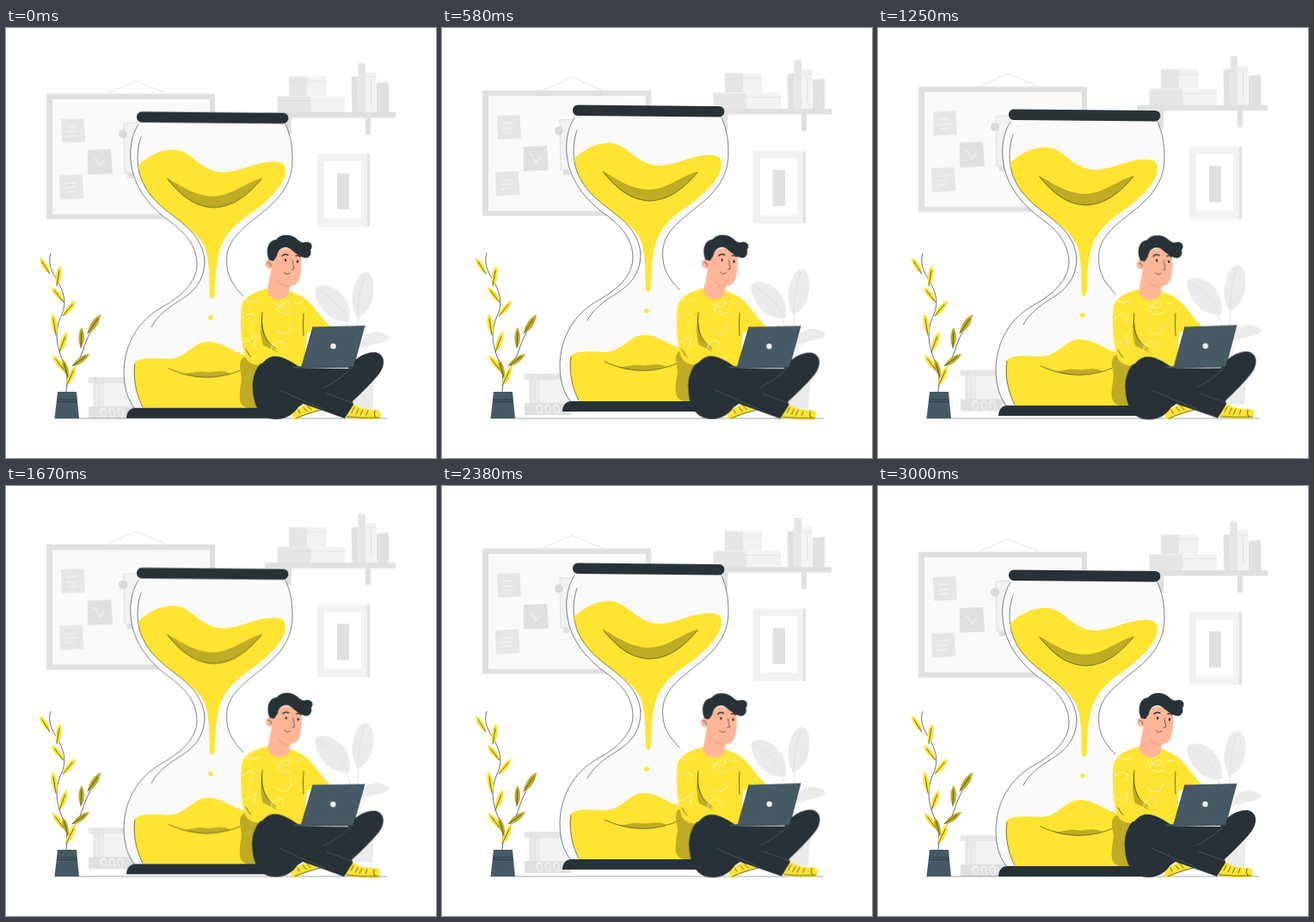
These frames come from a looping animation (500 by 500 pixels, 3040 ms). An HTML page:

```html
<!DOCTYPE html>
<html lang="en">
<head>
<meta charset="utf-8">
<title>Hourglass</title>
<style>
html, body { margin: 0; width: 100%; height: 100%; overflow: hidden; background: #fff; }
svg { display: block; width: 100vw; height: 100vh; }
.wall, .glass, .man { animation: 3040ms linear -20ms infinite; }
.wall { animation-name: drift; }
.glass { animation-name: hover; }
.man { animation-name: sway; transform-origin: 355px 348px; }

/* Motion fills 3000 ms, then rests for 40 ms */
@keyframes drift {
  0%, 98.684%, 100% { transform: translateY(0); }
  49.342% { transform: translateY(-10px); }
}
@keyframes hover {
  0%, 49.342%, 98.684%, 100% { transform: translateY(0); }
  24.671%, 74.013% { transform: translateY(-10px); }
}
@keyframes sway {
  0%, 49.342%, 98.684%, 100% { transform: rotate(0); }
  12.336%, 61.678% { transform: rotate(1deg); }
  37.007%, 86.349% { transform: rotate(-1deg); }
}

.y { fill: #ffe431; }
.olive { fill: #bfab25; }
.dark { fill: #263238; }
.slate { fill: #455a64; }
.skin { fill: #ffb698; }
.g1 { fill: #e0e0e0; }
.g2 { fill: #e6e6e6; }
.g3 { fill: #ebebeb; }
.g4 { fill: #f2f2f2; }
.g5 { fill: #fafafa; }
.ink, .pale, .grey { fill: none; stroke-linecap: round; stroke-linejoin: round; }
.ink { stroke: #263238; stroke-width: .7; }
.glass .ink { stroke-width: .6; }
.ink.brow { stroke-width: 1.4; }
.ink.seam { stroke: #52656e; }
.pale { stroke: #fff; stroke-width: .7; }
.grey { stroke: #dcdcdc; stroke-width: .8; }
</style>
</head>
<body>
<svg viewBox="0 0 500 500" xmlns="http://www.w3.org/2000/svg">
  <g class="wall">
    <!-- Pin board -->
    <path class="grey" d="M118 76L151 61.500L186 76"/>
    <path class="g1" d="M47 76.500H243V222.500H47Z"/>
    <path class="g5" d="M54 83H237V216.500H54Z"/>
    <path class="g2" d="M64 106L90.500 105L92 132.500L65 133.500Z"/>
    <path class="g1" d="M95 142L122 141L124 169.500L95 170.500Z"/>
    <path class="g2" d="M62 171.500L88.500 170.500L90.500 198L63 199.500Z"/>
    <path class="pale" d="M71 115l11-1M70 121l14-1M72 126l10-1M69 181l13-1M68 186l14-1M70 191l10-1M102 151l3 1 2 6h5l2-4M107 161l4-1"/>
    <path class="g4" stroke="#e0e0e0" d="M137 111L175 109V169H138Z"/>
    <path class="g1" d="M141 169h7v6h-7Z"/>
    <circle cx="136" cy="123.500" r="5" fill="#d9d9d9"/>

    <!-- Shelf -->
    <path class="g1" d="M301 98H453V104.500H301ZM418 104H424V124H418ZM326 104H332V124H326Z"/>
    <path class="g2" d="M329 56.500H350V79H329ZM315.500 79.500H354V98H315.500Z"/>
    <path class="g4" d="M350 56.500H372V79H350ZM354 79.500H394V98H354Z"/>
    <path class="grey" opacity=".7" d="M329 62H372M316 84.500H394"/>
    <path class="g1" d="M401.500 57L409.500 56V98H402.500ZM431 64L445 63V98H431Z"/>
    <path class="g2" d="M409.500 41H418V98H409.500Z"/>
    <path class="g4" d="M418 52L430.500 51.500V98H418Z"/>
    <path class="grey" d="M411 46h6M411 50h6M424.500 60V90M420 57h9"/>
    <path class="pale" opacity=".45" stroke-dasharray="1 3" d="M434 67V96M438 67V96M442 67V96"/>

    <!-- Picture -->
    <path class="g4" d="M362 146.500H420V231H362Z"/>
    <path class="g1" d="M420 146.500H423V231H420Z"/>
    <path fill="#fff" d="M370 155H413V221.500H370Z"/>
    <path class="g1" d="M385 169H399V211H385Z"/>

    <!-- Grey plant -->
    <path class="grey" d="M362 303Q393 325 402 360M417 289Q409 320 409 365M440 361Q413 367 411 390"/>
    <path class="g3" d="M360 302C369 295 386 302 394 314C400 324 401 334 399 341C385 344 370 334 364 321C360 312 358 307 360 302Z"/>
    <path class="g3" d="M418 284C426 285 429 297 427 310C425 325 417 334 409 337C402 329 401 312 405 300C408 291 412 285 418 284Z"/>
    <path class="g3" d="M412 373C411 360 421 353 433 354C441 355 446 358 446 361C441 368 427 366 412 373Z"/>
    <path class="grey" d="M362 303Q390 322 399 341M417 288Q408 315 409 337"/>
    <path class="g3" d="M385 398H429L426 446H390Z"/>

    <!-- Stacked boxes -->
    <path class="g2" d="M96 406H150V413H96Z"/>
    <path class="g4" d="M101 413H150V441H101Z"/>
    <path class="g3" d="M101 413H112V441H101Z"/>
    <path class="g1" d="M96 440H150V454H96Z"/>
    <path class="grey" d="M104 407v33M108 414v26M113 408v32"/>
    <path class="pale" d="M110 446q1-5 4-4t2 8t-5-1t4-6M120 446q1-5 4-4t2 8t-5-1t4-6M130 446q1-5 4-4t2 8t-5-1t4-6"/>
  </g>

  <path class="ink" opacity=".6" d="M57 454H443"/>

  <g class="glass">
    <path fill="#fafafa" opacity=".94" d="M154 109C145 125 143 145 146 161C150 186 166 206 185 221C208 237 222 253 222 276C221 297 203 313 181 325C153 341 138 368 137 399C137 420 142 433 150 443H325L338 400C330 350 300 332 276 312C261 297 255 284 257 264C260 245 274 234 294 218C319 199 334 180 333 151C333 134 329 120 323 110Z"/>
    <path class="ink" d="M154 112C145 126 143 145 146 161C150 186 166 206 185 221C208 237 222 253 222 276C221 297 203 313 181 325C153 341 138 368 137 399C137 420 142 433 150 443M324 110C329 120 333 134 333 151C334 180 319 199 294 218C274 234 260 245 257 264C255 284 261 297 276 312"/>
    <path class="ink" d="M157 127C153 138 152 152 154 163M231 270C231 300 212 311 196 321C184 329 175 337 169 348"/>

    <path class="y" d="M153.500 160C164 150 181 140 198 142C218 145 227 168 253 168C276 167 292 154 316 156C325 157 326 164 324 173C319 188 302 203 285 215.500C264 229 251 245 247 263C243 283 243 300 242.500 312Q240 318 237 312C236 291 237 274 232 257C227 243 210 231 191 216C174 203 157 187 153.500 160Z"/>
    <path class="ink" d="M154 164C158 187 174 203 191 216C209 230 228 243 231 270"/>
    <path class="olive" d="M186 174C203 183 217 195 241 196C263 195 276 181 298 174.500C281 195 263 209 240 209C217 207 202 194 186 174Z"/>
    <path class="ink" d="M188 176C203 194 217 207 240 209C263 209 281 195 297 176"/>
    <circle class="y" cx="238" cy="337" r="2.800"/>

    <path class="y" d="M149 390C154 383 172 384 188 385C210 385 217 365 235 365C252 365 262 377 280 381L300 390V443H160C152 429 147 408 149 390Z"/>
    <path class="ink" d="M150 391C147 408 152 428 159 441"/>
    <path class="olive" d="M201 401C213 404 218 399 230 400C242 402 249 396 261 402Q231 411 201 401Z"/>
    <path class="ink" d="M189 396Q234 417 278 396"/>
    <path class="olive" d="M280 382C268 385 273 397 274 407C273 419 266 440 282 442H300V383Z"/>

    <path class="dark" d="M158 97.500L322 99C331 99 330 111.500 322 111.500L158 110C150 110 150 97.500 158 97.500Z"/>
    <path class="dark" d="M140 454C140 447 144 442 150 442H310V454Z"/>
  </g>

  <!-- Potted branch -->
  <path class="ink" d="M52 262C47 277 57 288 62 298C70 314 69 324 64 335C55 356 60 372 66 387C71 399 72 411 70 423M71 412C78 394 84 391 89 376C94 359 101 350 108 335"/>
  <g id="leaves"></g>
  <path class="slate" d="M60 423H82L85 454H56.500Z"/>
  <path class="ink" d="M60 432H82M60 434.500H82"/>

  <g class="man">
    <!-- Shoes -->
    <path class="y" d="M333 449C334 442 345 442 352 435L369 442C359 447 347 450 339 455C334 456 332 453 333 449Z"/>
    <path class="y" d="M403 435C408 442 419 444 432 444C437 445 437 453 433 455C420 455 408 455 396 453C394 449 398 441 403 435Z"/>
    <path class="ink" d="M337 454Q350 448 367 444M346 441l4 5M350 438l5 6M340 444l2 4M397 452Q415 454 434 453M405 441l-3 6M410 443l-3 6M415 444l-3 6M421 445l-2 5M429 445q-2 4 1 8"/>

    <!-- Torso -->
    <path class="y" d="M304 303C288 307 274 313 273.500 328C272 351 274 368 278 382C282 391 291 394 300 390L347 396L350 354L379 349C365 337 357 320 344 312L330 306Z"/>
    <path class="skin" d="M309 278L304 304C304 314 317 321 328 311L331 297Z"/>
    <path fill="#f0937a" opacity=".5" d="M315 293Q319 303 329 301L330 298Z"/>
    <path class="olive" d="M298 332C297 351 302 368 318 378L299 369C295 356 296 342 298 332Z"/>
    <path class="ink" d="M298 331C296 351 300 363 314 373M346 332Q345 345 346 358M279 374Q286 389 300 390"/>
    <path class="pale" d="M279 316q9 5 16-1M275 337q9-7 14-3t-2 9M275 365q10 0 14-8t-1 14M313 321q12 8 16 1t-6-2t-5 10t16 0M314 351q9 8 15 1t1-8M308 374q3-11 10-10t5 7M335 318q3 5 10 0"/>

    <!-- Head -->
    <ellipse class="skin" cx="306.500" cy="274.500" rx="5" ry="5.500"/>
    <path class="skin" d="M309 279C311 264 318 253 330 257L343 265C344 278 343 290 338 297C331 303 319 299 313 290Z"/>
    <path class="dark" d="M306 270C301 260 304 247 314 246C319 239 332 239 339 246C342 249 345 250 348 249C354 248 358 253 354 258C356 264 351 269 346 267C339 265 335 260 329 256C322 253 316 258 315 265L311 271Z"/>
    <ellipse class="dark" cx="325" cy="270" rx="1.200" ry="1.700"/>
    <ellipse class="dark" cx="339" cy="271.500" rx="1.200" ry="1.700"/>
    <path class="ink" d="M333 270Q334 276 335 280L332 281M323 284Q326 288 330 285M304 273q3-2 4 4"/>
    <path class="ink brow" d="M321 265q3-3 7-1M337 265q3-1 5 1"/>

    <!-- Legs -->
    <path class="dark" d="M287 421C285 399 298 382 313 381.500C325 382 335 391 345 396H398C405 384 418 376 430 377C442 380 441 393 434 402C425 413 413 425 403 434L404 438L394 454L366 444L346 437L340 441C335 448 327 455 314 455C296 455 288 440 287 421Z"/>
    <path class="ink seam" d="M318 421Q342 432 369 443M370 418Q392 407 404 393M373 425L403 436"/>

    <!-- Forearm and laptop -->
    <path class="y" d="M287 376C302 372 312 381 321 381L345 386L343 392C331 388 324 382 313 381.500C307 382 302 385 298 390Q290 391 284 388Z"/>
    <path class="slate" d="M357 347.500L417 346L404 394.500L334 396V394L344 393Z"/>
    <path class="ink" d="M334 395.500L404 394.500M357 347.500L344 393M417 346L404 394.500"/>
    <circle cx="380.500" cy="370" r="3.200" fill="#f2f2f2"/>
  </g>
</svg>
<script>
// Each leaf: base x, base y, tip x, tip y
const bright = [
  [51, 286, 39, 267], [59, 300, 63, 276], [67, 319, 53, 301], [66, 335, 81, 317],
  [58, 357, 54, 332], [62, 377, 71, 353], [68, 399, 54, 380], [70, 416, 81, 393]
];
const shaded = [
  [72, 406, 66, 385], [77, 393, 97, 379], [87, 372, 88, 348], [95, 355, 110, 333]
];

function leaf([x, y, tx, ty], tone) {
  const at = (along, side) =>
    `${x + (tx - x) * along - (ty - y) * side} ${y + (ty - y) * along + (tx - x) * side}`;
  const blade = `M${x} ${y}C${at(.25, .2)} ${at(.7, .18)} ${tx} ${ty}` +
    `C${at(.75, -.17)} ${at(.3, -.17)} ${x} ${y}Z`;
  return `<path class="${tone}" d="${blade}"/><path class="ink" d="M${x} ${y}L${at(.75, 0)}"/>`;
}

document.getElementById('leaves').innerHTML =
  bright.map(l => leaf(l, 'y')).join('') + shaded.map(l => leaf(l, 'olive')).join('');
</script>
</body>
</html>
```
